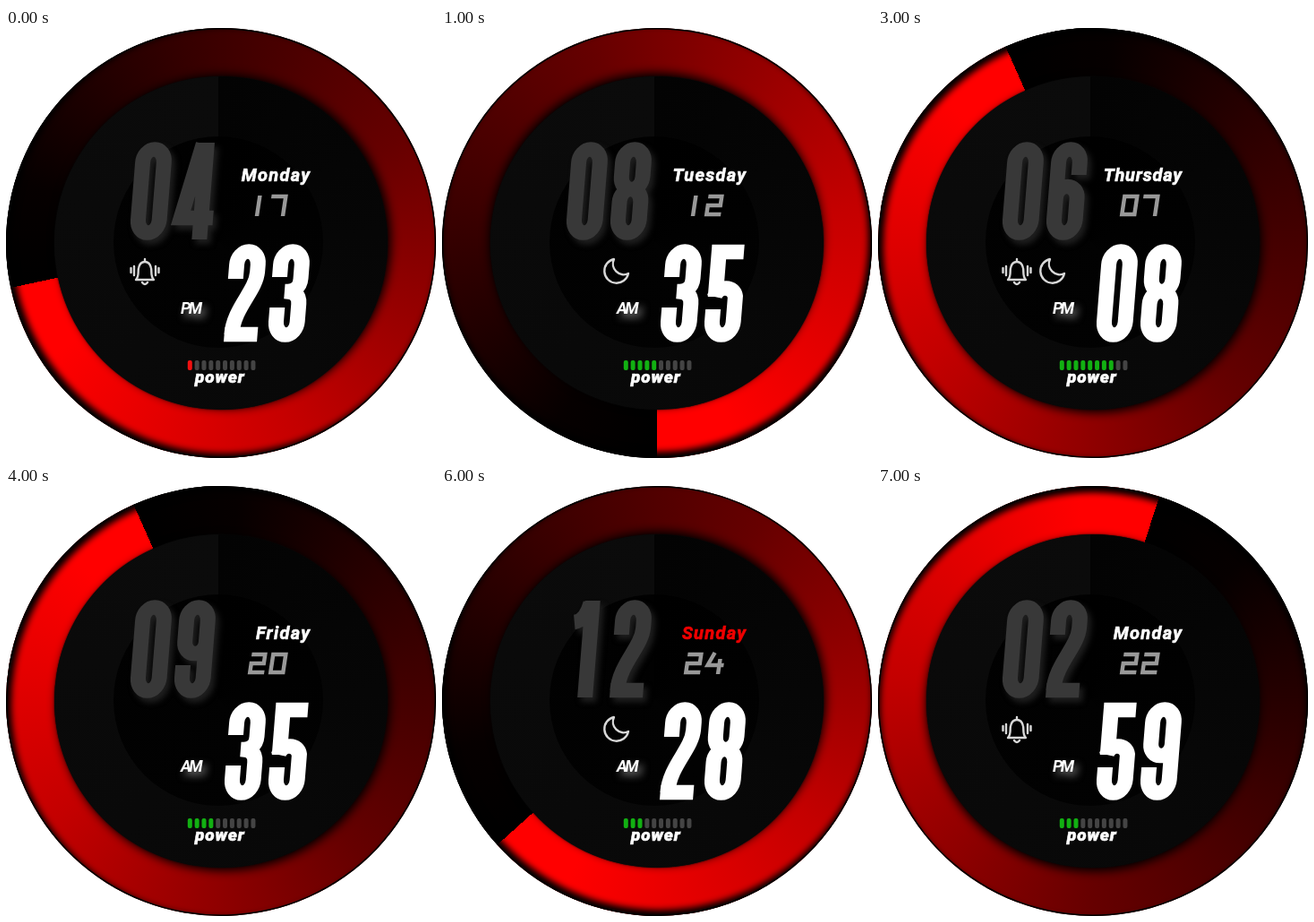
Animation, 480 px wide and 480 px high, one loop 8000 ms. Source, as an HTML page:

```html
<!DOCTYPE html>
<html lang="en">
<meta charset="utf-8">
<title>Watch face</title>
<style>
html, body { margin: 0; width: 100%; height: 100%; overflow: hidden; background: #fff }
#stage { position: relative; width: 480px; height: 480px; overflow: hidden }
#stage > *, #ring i { position: absolute; border-radius: 50% }
#ring {
  inset: 0;
  background: conic-gradient(#000, #060000 8%, #3c0000 28%, #660000 45%, #c40000 72%, #f00 94%);
  box-shadow: inset 0 0 0 1.5px #000, inset 2px 5px 7px 2px #000;
}
#ring i { inset: 54px; background: #080808; box-shadow: 1px 4px 11px #000 }
#disc { inset: 54px; background: conic-gradient(at 49.1% 50%, #030303, #080808 40%, #0b0b0b); box-shadow: 0 0 2px #080808 }
#core { left: 120px; top: 121px; width: 234px; height: 236px; background: conic-gradient(#000, #020202 40%, #010101) }
svg { inset: 0 }
svg path { fill: none }
text { font-family: Roboto, sans-serif; font-style: italic; font-weight: 700; fill: #fff }
#hour { stroke: #383838; filter: drop-shadow(4px 5px 3px #1e1e1e) }
#minute { stroke: #fff }
.big { stroke-width: 16.5 }
#date { stroke: #999; stroke-width: 4.5 }
#day { font-size: 20px; text-anchor: end; stroke-width: .6 }
#half { font-size: 18px; letter-spacing: -2.6px; filter: drop-shadow(4px 5px 4px #777) }
#power { font-size: 19px; font-weight: 900; letter-spacing: .9px; stroke: #fff; stroke-width: .6 }
.icon { stroke: #d8d8d8; stroke-width: 2.4; stroke-linecap: round; stroke-linejoin: round }
</style>
<div id="stage">
  <div id="ring"><i></i></div>
  <div id="disc"></div>
  <div id="core"></div>
  <svg width="480" height="480">
    <g id="hour" class="big"></g>
    <g id="minute" class="big"></g>
    <g id="date"></g>
    <text id="day" y="171"></text>
    <text id="half" x="195" y="319"></text>
    <g id="bell" class="icon">
      <path d="M145 281C149 277 147 272 148 268C149 263 152 261 155 261S161 263 162 268C163 272 161 277 165 281ZM152 284Q155 288 158 284M155 261V258"/>
      <path d="M143 266V276M139.500 268V273M167 266V276M170.500 268V273"/>
    </g>
    <path id="moon" class="icon" d="M192 258A13.500 13.500 0 1 0 208 274A12 12 0 0 1 192 258Z"/>
    <g id="bars"></g>
    <text id="power" x="211" y="396">power</text>
  </svg>
</div>
<script>
const $ = id => document.getElementById(id);

// Condensed numerals, 38 x 108, drawn as centre lines
const bigDigits = [
  'M7.5 22a11.5 14.5 0 0 1 23 0V86a11.5 14.5 0 0 1-23 0Z',
  'M21 108V0M3 24Q15 22 19 2',
  'M7.5 38V22a11.5 14.5 0 0 1 23 0V30C30.5 52 8 70 8 100M0 100H36',
  'M7.5 36V22a11.5 14.5 0 0 1 23 0V38Q30.5 52 14 52M14 52Q30.5 52 30.5 66V86a11.5 14.5 0 0 1-23 0V70',
  'M28 108V0M24 1L6 84H41',
  'M36 8H9V58M8 58a11.5 12 0 0 1 22.5 0V86a11.5 14.5 0 0 1-23 0V72',
  'M30.5 36V22a11.5 14.5 0 0 0-23 0V86a11.5 14.5 0 0 0 23 0V62a11.5 13 0 0 0-23 0',
  'M0 8H30C30 40 14 60 14 108',
  'M7.5 22a11.5 14.5 0 0 1 23 0V38a11.5 14 0 0 1-23 0ZM7.5 66a11.5 14 0 0 1 23 0V86a11.5 14.5 0 0 1-23 0Z',
  'M7.5 72V86a11.5 14.5 0 0 0 23 0V22a11.5 14.5 0 0 0-23 0V46a11.5 13 0 0 0 23 0'
];
// Square numerals for the date, 18 x 24
const smallDigits = {
  0: 'M2 2H16V22H2Z', 1: 'M10 1V24', 2: 'M1 2H16V12H2V22H18',
  4: 'M8 0L2 14H20M15 7V24', 7: 'M0 2H16V24'
};

// day, date, hour, minute, half, second, charge, bell, moon
const states = [
  ['Monday', '17', '04', '23', 'PM', 43, 1, 1, 0],
  ['Tuesday', '12', '08', '35', 'AM', 30, 5, 0, 1],
  ['Wednesday', '02', '10', '46', 'AM', 17, 6, 0, 0],
  ['Thursday', '07', '06', '08', 'PM', 56, 8, 1, 1],
  ['Friday', '20', '09', '35', 'AM', 56, 4, 0, 0],
  ['Saturday', '04', '04', '04', 'PM', 54, 6, 0, 0],
  ['Sunday', '24', '12', '28', 'AM', 38, 3, 0, 1],
  ['Monday', '22', '02', '59', 'PM', 3, 3, 1, 0]
];
const dayColors = { Saturday: '#4cc8ff', Sunday: '#f00000' };
const daySpacing = { Wednesday: -.2, Thursday: .8 };

function numerals(id, text, glyphs, x, y, height, advance, slant, width = 1) {
  $(id).innerHTML = [...text].map((c, i) =>
    `<path d="${glyphs[c]}" transform="matrix(${width} 0 ${-slant} 1 ${x + i * advance + height * slant} ${y})"/>`).join('');
}

function show([day, date, hour, minute, half, second, charge, bell, moon]) {
  $('ring').style.transform = `rotate(${second * 6}deg)`;
  numerals('hour', hour, bigDigits, 138, 128, 108, 49, .08, 1.03);
  numerals('minute', minute, bigDigits, 243, 242, 108, 49, .08, 1.03);
  numerals('date', date, smallDigits, 270, 186, 24, 23, .15);

  const spacing = daySpacing[day] ?? 1.3, label = $('day');
  label.textContent = day;
  label.setAttribute('x', 339 + spacing);
  label.style.letterSpacing = spacing + 'px';
  label.style.fill = label.style.stroke = dayColors[day] || '#fff';

  $('half').textContent = half;
  $('bell').style.display = bell ? '' : 'none';
  $('moon').style.display = moon ? '' : 'none';
  const lit = charge < 2 ? '#f01010' : '#12b012';
  $('bars').innerHTML = Array.from({ length: 10 }, (_, i) =>
    `<rect x="${202.8 + i * 7.85}" y="371" width="5" height="11" rx="2" fill="${i < charge ? lit : '#444'}"/>`).join('');
}

let current = -1;
function tick() {
  const index = Math.floor(performance.now() / 1000) % states.length;
  if (index !== current) show(states[current = index]);
  requestAnimationFrame(tick);
}
tick();
</script>
</html>
```
